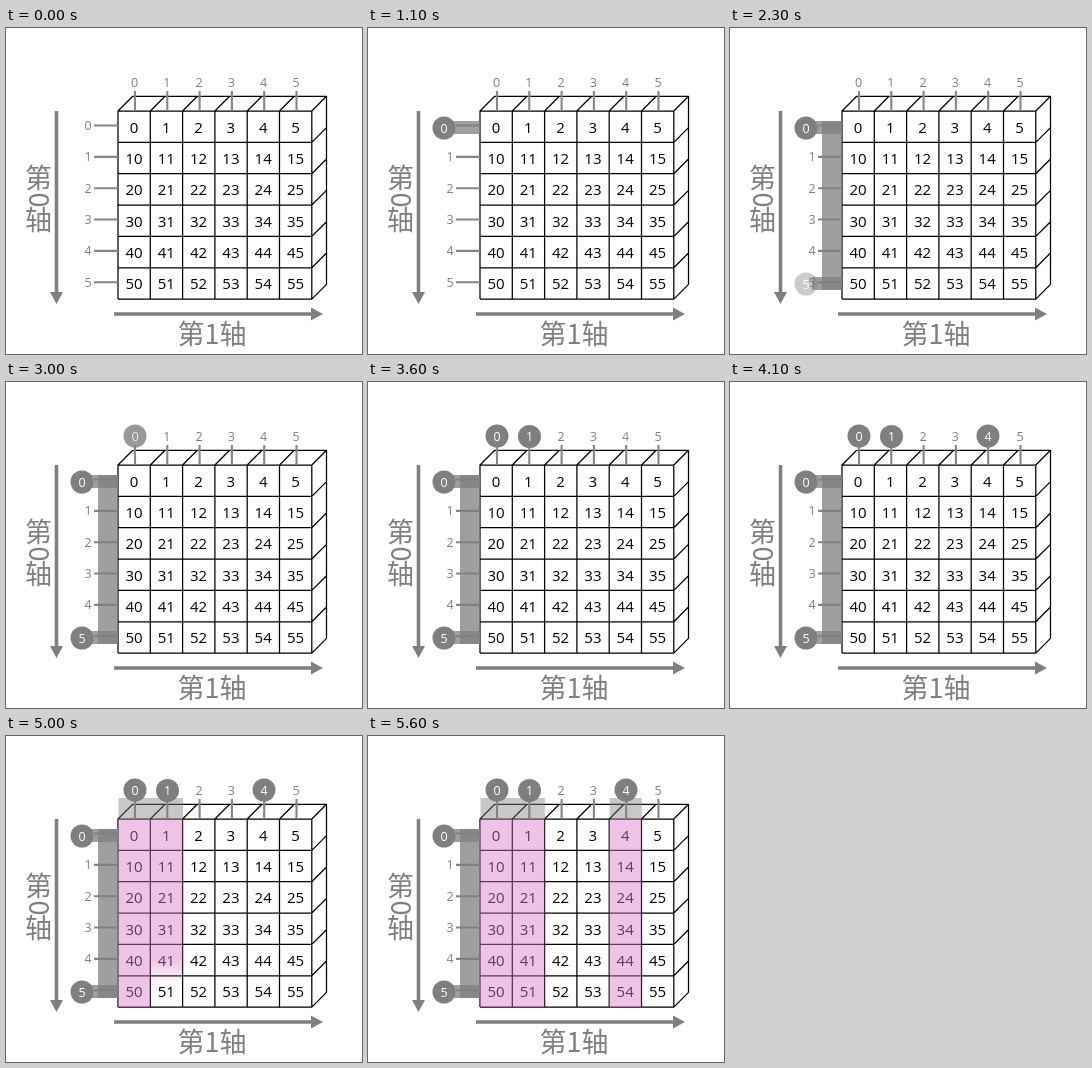
An HTML page for the animation above (5.7 s loop, 356 by 326 pixels).

```html
<!DOCTYPE html>
<html lang="zh">
<head>
<meta charset="utf-8">
<style>
html, body { margin: 0; width: 100%; height: 100%; overflow: hidden; background: #fff; }
svg { display: block; width: 100vw; height: 100vh; }
text { text-anchor: middle; font-family: "Open Sans", "Noto Sans", sans-serif; }
.cell { font-size: 15px; }
.label { font-size: 12.5px; fill: #7f7f7f; }
.badge { font-size: 12.5px; fill: #fff; }
.axis { font: 300 27px "Noto Sans CJK SC", "Noto Sans CJK", sans-serif; fill: #7f7f7f; }
</style>
</head>
<body>
<svg id="stage" viewBox="0 0 356 326"></svg>
<script>
const NS = "http://www.w3.org/2000/svg";
const stage = document.getElementById("stage");
const LOOP = 5700, STEP = 100, DURATION = 500;
const GRAY = "#7f7f7f", SIZE = 6;
const LEFT = 112, TOP = 83, CELL_W = 32.3, CELL_H = 31.35, DEPTH = 14.7;
const colX = i => LEFT + i * CELL_W;
const rowY = i => TOP + i * CELL_H;
const RIGHT = colX(SIZE), BOTTOM = rowY(SIZE);

function add(name, attrs, parent = stage, text) {
  const node = document.createElementNS(NS, name);
  for (const key in attrs) node.setAttribute(key, attrs[key]);
  if (text !== undefined) node.textContent = text;
  return parent.appendChild(node);
}
const path = (d, stroke, width) =>
  add("path", { d, fill: "none", stroke, "stroke-width": width, "stroke-linejoin": "round" });
const label = (cls, x, y, text, parent) => add("text", { class: cls, x, y }, parent, text);
const rect = (x, y, width, height, fill, opacity, parent) =>
  add("rect", { x, y, width, height, fill, "fill-opacity": opacity }, parent);

function drawArray() {
  let d = `M${LEFT + DEPTH} ${TOP - DEPTH}H${RIGHT + DEPTH}V${BOTTOM - DEPTH}`;
  for (let i = 0; i <= SIZE; i++) {
    d += `M${colX(i)} ${BOTTOM}V${TOP}l${DEPTH} ${-DEPTH}`;
    d += `M${LEFT} ${rowY(i)}H${RIGHT}l${DEPTH} ${-DEPTH}`;
  }
  path(d, "#000", 1.25);
  for (let r = 0; r < SIZE; r++) {
    for (let c = 0; c < SIZE; c++) {
      label("cell", colX(c) + 16, rowY(r) + 21.5, r * 10 + c);
    }
  }
}

function drawAxes() {
  for (let i = 0; i < SIZE; i++) {
    const x = colX(i) + 17, y = rowY(i) + 14.5;
    path(`M${x} 63V83M88 ${y}H${LEFT}`, "#858585", 2.1);
    label("label", x - 0.5, 58.5, i);
    label("label", 82, y + 4.5, i);
  }
  path("M50.5 83V266M108 286H306", GRAY, 3.6);
  add("path", { d: "M44 264H57L50.5 276ZM305 279.5V292.5L317 286Z", fill: GRAY });
  label("axis", 206, 316, "第1轴");
  label("axis", 32.5, 160, "第");
  add("text", { class: "axis", transform: "translate(23 172) rotate(90)" }, stage, "0");
  label("axis", 32.5, 202, "轴");
}

const updates = [];
const progress = (time, start) => Math.min(1, Math.max(0, (time - start) / DURATION));

function fadeBadge(start, x, y, text) {
  const group = add("g", {});
  add("circle", { cx: x, cy: y, r: 11.5, fill: GRAY }, group);
  label("badge", x, y + 4.5, text, group);
  updates.push(time => group.setAttribute("opacity", progress(time, start)));
}

// Reveals a group with a soft edge travelling from one coordinate to another.
function wipe(start, axis, from, to, soft) {
  const id = "wipe" + start;
  const gradient = add("linearGradient", {
    id: id + "g", gradientUnits: "userSpaceOnUse", x1: 0, x2: 0, y1: 0, y2: 0
  });
  add("stop", { offset: 0, "stop-color": "#fff" }, gradient);
  add("stop", { offset: 1, "stop-color": "#000" }, gradient);
  const mask = add("mask", { id, maskUnits: "userSpaceOnUse", x: 0, y: 0, width: 356, height: 326 });
  rect(0, 0, 356, 326, `url(#${id}g)`, 1, mask);
  const group = add("g", { mask: `url(#${id})` });
  const dir = Math.sign(to - from);
  updates.push(time => {
    const p = progress(time, start);
    const head = from + (to - from + dir * soft) * p;
    gradient.setAttribute(axis + 1, head - dir * soft);
    gradient.setAttribute(axis + 2, head);
    group.setAttribute("visibility", p > 0 ? "visible" : "hidden");
  });
  return group;
}

function highlightColumn(start, column) {
  const group = wipe(start, "y", 62, BOTTOM, 25);
  rect(colX(column) + 0.5, 62, CELL_W, TOP - 62, GRAY, 0.43, group);
  rect(colX(column), TOP, CELL_W, BOTTOM - TOP, "#dc7ac6", 0.45, group);
}

drawArray();
drawAxes();

rect(82, 93, 30, 13, GRAY, 0.75, wipe(600, "x", 82, 112, 5));
rect(92, 93, 20, 169, GRAY, 0.75, wipe(1100, "y", 93, 262, 20));
rect(82, 249, 30, 13, GRAY, 0.75, wipe(1600, "x", 112, 82, 5));
highlightColumn(4100, 0);
highlightColumn(4600, 1);
highlightColumn(5100, 4);

fadeBadge(100, 76, 100, 0);
fadeBadge(2100, 76, 256, 5);
fadeBadge(2600, 129, 54, 0);
fadeBadge(3100, 161.5, 54.5, 1);
fadeBadge(3600, 258, 54, 4);

function render(now) {
  const time = Math.floor((now % LOOP) / STEP) * STEP;
  updates.forEach(update => update(time));
}
const origin = performance.now();
function tick() {
  render(performance.now() - origin);
  requestAnimationFrame(tick);
}
render(0);
requestAnimationFrame(tick);
</script>
</body>
</html>
```
